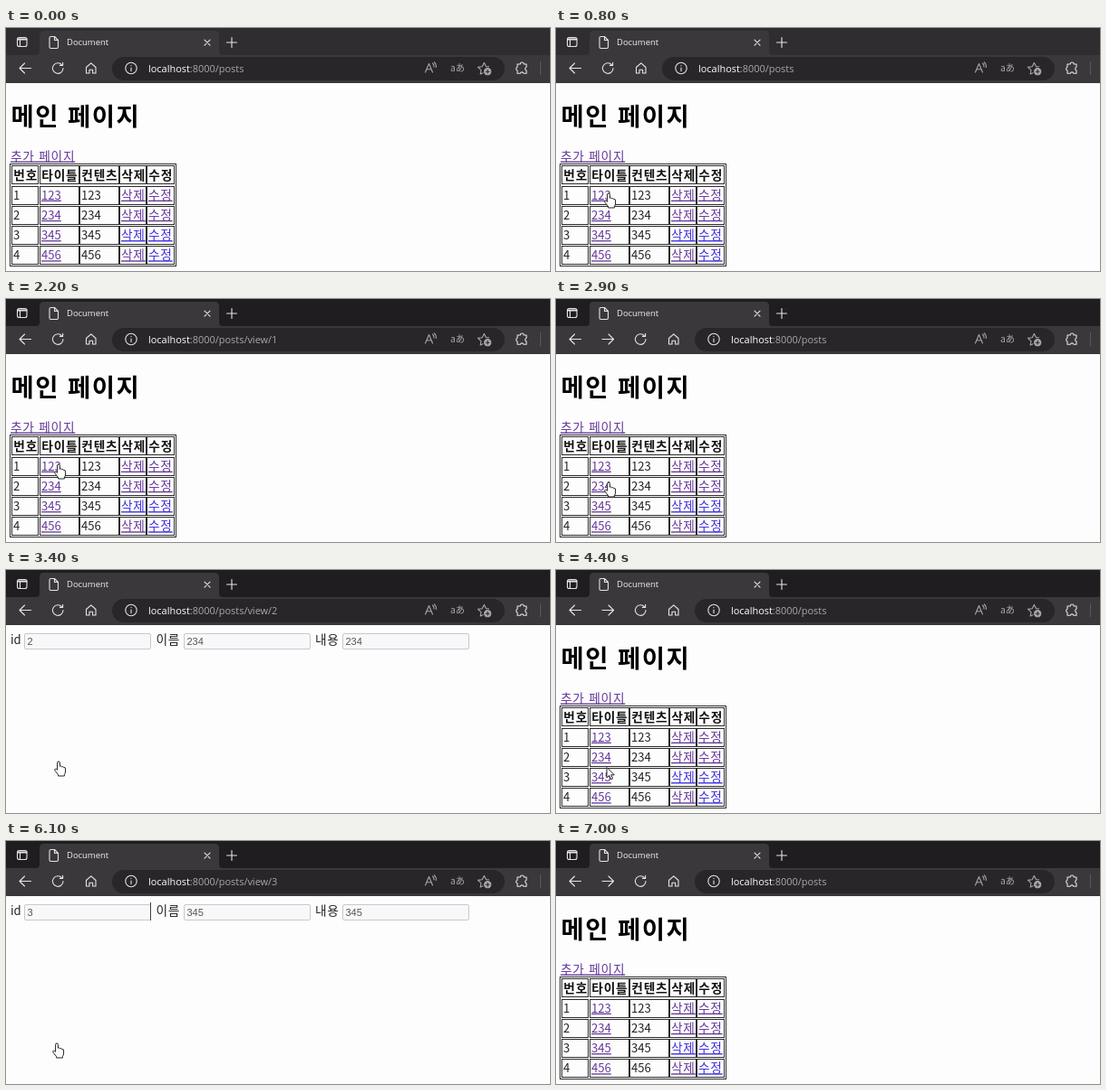
An HTML page that plays this animation: 600x269 px, repeating every 7.1 s.

```html
<!DOCTYPE html>
<html lang="ko">
<head>
<meta charset="utf-8">
<title>Document</title>
<style>
  html, body { margin: 0; width: 100%; height: 100%; overflow: hidden; background: #fefdfe; }
  svg { display: block; width: 600px; height: 269px; }
  text { white-space: pre; }
  .ui { font-family: "Open Sans", "Noto Sans", sans-serif; }
  .ko { font-family: "Noto Sans CJK KR", "Noto Sans CJK JP", "Noto Sans CJK", sans-serif; font-size: 13.7px; letter-spacing: .75px; fill: #222; }
  .num { font-size: 13.1px; letter-spacing: 0; }
  .bold { font-weight: 700; fill: #111; }
  .title { font-size: 27.4px; letter-spacing: 1.5px; fill: #000; }
  .link { fill: #65389a; text-decoration: underline; text-decoration-thickness: 1px; }
  .fresh { fill: #3c2fdd; }
  .field { font: 11px "Liberation Sans", Arial, sans-serif; fill: #555; }
  .icon { fill: none; stroke: #e6e4e7; stroke-width: 1.1; stroke-linecap: round; stroke-linejoin: round; }
  .dim { stroke: #a9a7ab; }
  .box { fill: none; stroke: #2c2c2c; stroke-width: 1; }
  .cursor { fill: #fff; stroke: #222; stroke-width: 1; stroke-linejoin: round; }
</style>
</head>
<body>
<svg viewBox="0 0 600 269">
  <rect id="strip" width="600" height="40"/>
  <path d="M0 30H33Q37 30 37 26V8Q37 3 42 3H230Q235 3 235 8V26Q235 30 239 30H600V61H0Z" fill="#3b383c"/>

  <g class="icon">
    <rect x="12.5" y="10.5" width="10.5" height="10" rx="2"/>
    <path d="M13 12.5H22.5" stroke-width="2"/>
    <path d="M15.5 13V20"/>
    <path d="M48 11Q48 9.5 49.5 9.5H53.5L57.5 13.5V21Q57.5 22.5 56 22.5H49.5Q48 22.5 48 21ZM53.5 9.5V13.5H57.5"/>
    <path d="M219 13.2L225 19.2M225 13.2L219 19.2"/>
    <path d="M249 10.5V21.5M243.5 16H254.5"/>
    <path d="M27.5 44.5H15M20.5 39L15 44.5L20.5 50"/>
    <path id="forward" d="M51 44.5H63.5M58 39L63.5 44.5L58 50"/>
  </g>
  <text class="ui" x="67" y="19.4" font-size="9.45" fill="#f2f0f3">Document</text>

  <rect id="pill" y="32" height="26" rx="13" fill="#292629"/>
  <g id="bar">
    <g class="icon">
      <path d="M61.8 41A5.8 5.8 0 1 0 63 44.5M62.6 38.3V41.4H59.4"/>
      <path d="M88.5 43.5L93.8 38.8L99 43.5V50H95.6V46.2H92V50H88.5Z"/>
      <circle cx="138" cy="44.5" r="6.2"/>
      <path d="M138 44V47.6M138 41.4V41.6"/>
    </g>
    <text class="ui" x="157" y="48.6" font-size="10.95" fill="#aaa8ac"><tspan fill="#fff">localhost</tspan><tspan id="path"></tspan></text>
  </g>

  <g class="icon dim">
    <path d="M462.5 49L466.5 39.5L470.5 49M464 45.8H469M470.5 39Q472.3 40.5 472 43M472.3 37.8Q474.8 40 474.3 43.5"/>
    <path d="M532.5 42.7H529.6L527.4 38.4L525.2 42.7L520.5 43.4L524 46.7L523.2 51L526 49.7"/>
    <circle cx="531.2" cy="48.2" r="3.6" fill="#a9a7ab"/>
    <path d="M529.4 48.2H533M531.2 46.4V50" stroke="#292629"/>
  </g>
  <text class="ko" x="490" y="48.2" style="font-size:10.3px;letter-spacing:0;fill:#a9a7ab">aあ</text>
  <path class="icon" d="M564 40H567.2A2 2 0 0 1 571.2 40H574V43.2A2 2 0 0 0 574 47V50.3H571A2 2 0 0 0 567.2 50.3H564V47A2 2 0 0 1 564 43.2Z"/>
  <path d="M589.5 37V52" stroke="#5b585d"/>

  <g id="list"></g>
  <g id="view"></g>
  <path id="edge" d="M159.5 68V88" stroke="#444"/>

  <path id="arrow" class="cursor" d="M0 0V11.5L2.7 9L4.6 13.2L6.6 12.3L4.7 8.3H8.3Z"/>
  <path id="hand" class="cursor" d="M-1.4 1.3Q-1.4 0 0 0Q1.4 0 1.4 1.3V5.2Q2.7 4.5 3.7 5.8Q5 5.2 5.8 6.5Q7.6 6.1 7.6 8V11Q7.6 13 6.4 14.4V16H-.4V14.6L-3.8 10.4Q-5 8.6-3.6 8.1Q-2.6 7.9-1.4 9.3Z"/>
</svg>
<script>
const LOOP = 7100, STEP = 100, FOCUS = 1100;
const $ = id => document.getElementById(id);

const text = (x, y, cls, s) => `<text x="${x}" y="${y}" class="${cls}">${s}</text>`;
const box = (x, y, w, h) => `<rect x="${x + .5}" y="${y + .5}" width="${w}" height="${h}" class="box"/>`;

// Post list
const cols = [[6, 29, "번호"], [37, 43, "타이틀"], [81, 43, "컨텐츠"], [125, 29, "삭제"], [155, 30, "수정"]];
const PITCH = 22.2;
const rowY = i => Math.round(152.4 + i * PITCH);
const posts = ["123", "234", "345", "456"];

function listPage() {
  let out = text(5.5, 108, "ko bold title", "메인 페이지")
    + text(5, 146.5, "ko link", "추가 페이지") + box(4, 150, 183, 113);
  for (const [x, w, label] of cols) {
    out += text(x + 2.3, 167.5, "ko bold", label);
    for (let i = 0; i < 5; i++) out += box(x, rowY(i), w, 20);
  }
  posts.forEach((post, i) => {
    const y = 189.7 + i * PITCH;
    out += text(8, y, "ko num", i + 1) + text(39, y, "ko num link", post) + text(83, y, "ko num", post)
      + text(127, y, "ko link" + (i === 2 ? " fresh" : ""), "삭제")
      + text(157, y, "ko link" + (i > 1 ? " fresh" : ""), "수정");
  });
  return out;
}

// Detail page
function viewPage(id) {
  const fields = [[5, 20, "id", id], [165.5, 196, "이름", posts[id - 1]], [341, 371, "내용", posts[id - 1]]];
  return fields.map(([lx, x, label, value]) =>
    text(lx, 82, label === "id" ? "ko num" : "ko", label)
    + `<rect x="${x + .5}" y="70.5" width="139" height="17" rx="1.5" fill="#f8f7f9" stroke="#cac8cc"/>`
    + text(x + 3.5, 82.8, "field", value)).join("");
}

// [time, post shown (0 = list)]
const pages = [[0, 0], [1200, 1], [2100, 0], [3300, 2], [4100, 0], [5300, 3], [6200, 0]];
// [time, post in the address, forward button]
const addresses = [[0, 0, 0], [1200, 1, 0], [2300, 0, 1], [3300, 2, 0], [4200, 0, 1], [5300, 3, 0], [6300, 0, 1]];
// [time, x, y, shape]
const moves = [
  [0, 0, 0, ""], [300, 112, 236, "arrow"], [700, 58, 183, "hand"], [2600, 58, 183, "hand"],
  [2700, 58, 191, "arrow"], [2900, 58, 203, "hand"], [3100, 58, 212, "hand"], [4200, 58, 212, "hand"],
  [4400, 56, 218.5, "arrow"], [4600, 56, 224, "hand"], [6500, 56, 224, "hand"],
  [6600, 70, 232, "arrow"], [6800, 112, 242, ""]
];

const indexAt = (table, t) => table.findLastIndex(row => row[0] <= t);
const show = (id, on) => $(id).setAttribute("visibility", on ? "visible" : "hidden");

function drawCursor(t) {
  const i = indexAt(moves, t), [t0, x0, y0, shape] = moves[i];
  const [t1, x1, y1] = moves[i + 1] || [LOOP, x0, y0];
  const k = (t - t0) / (t1 - t0);
  const at = `translate(${x0 + (x1 - x0) * k} ${y0 + (y1 - y0) * k})`;
  for (const id of ["arrow", "hand"]) {
    show(id, id === shape);
    $(id).setAttribute("transform", at);
  }
}

function draw(t) {
  const post = pages[indexAt(pages, t)][1];
  const [, target, forward] = addresses[indexAt(addresses, t)];
  const shift = forward * 36;
  // The title strip darkens once the window has focus
  $("strip").setAttribute("fill", t < FOCUS ? "#2f2d30" : "#201d21");
  show("list", !post);
  $("view").innerHTML = post ? viewPage(post) : "";
  show("edge", post === 3 && t >= 5500);
  show("forward", forward);
  $("bar").setAttribute("transform", `translate(${shift} 0)`);
  $("pill").setAttribute("x", 117 + shift);
  $("pill").setAttribute("width", 433 - shift);
  $("path").textContent = ":8000/posts" + (target ? "/view/" + target : "");
  drawCursor(t);
}

$("list").innerHTML = listPage();
const start = performance.now();
let last = -1;
function tick() {
  const t = Math.floor((performance.now() - start) % LOOP / STEP) * STEP;
  if (t !== last) draw(last = t);
  requestAnimationFrame(tick);
}
tick();
</script>
</body>
</html>
```
